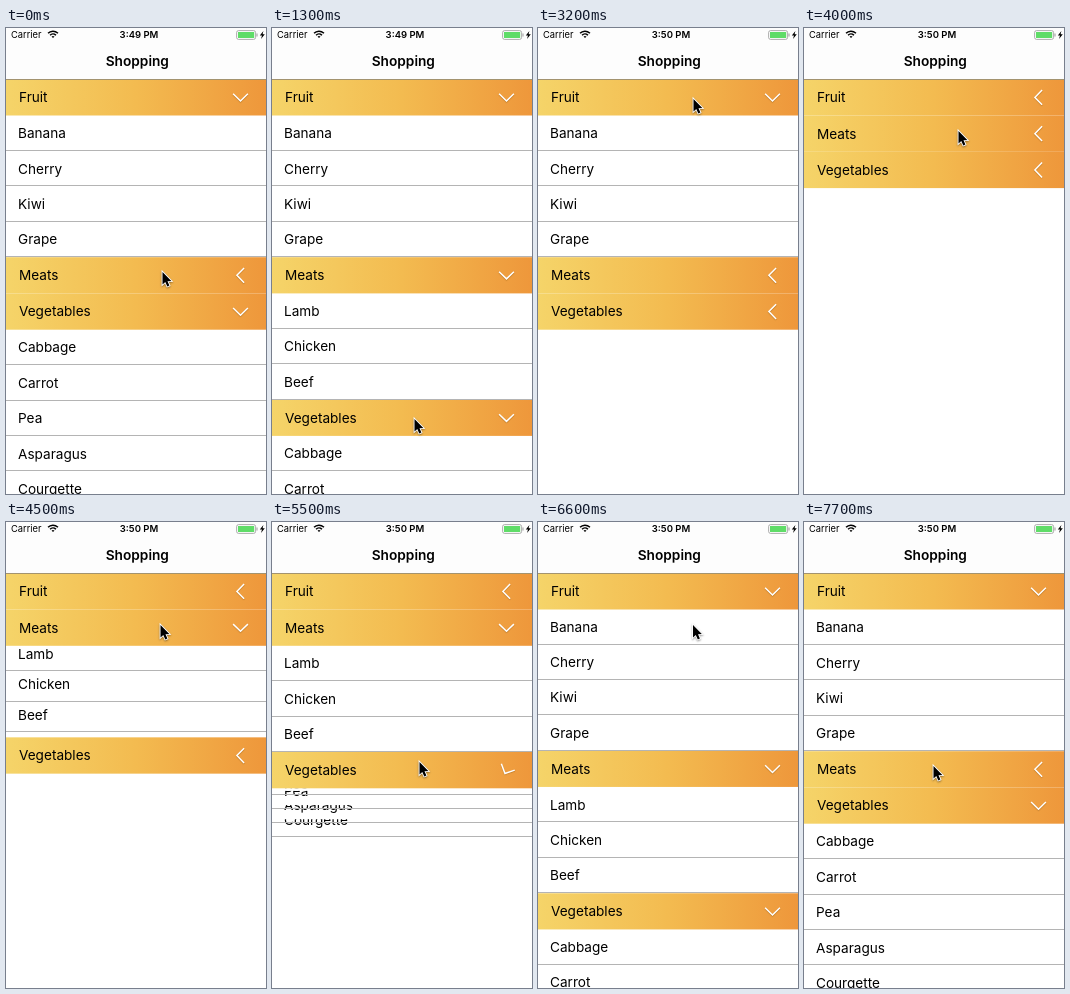
Animation of 260 by 466 pixels, one loop 8400 ms. Source, as an HTML page with a canvas:

```html
<!DOCTYPE html>
<html>
<head>
<meta charset="utf-8">
<style>
html, body { margin: 0; width: 100%; height: 100%; overflow: hidden; background: #fff; }
canvas { display: block; }
</style>
</head>
<body>
<canvas id="stage" width="260" height="466"></canvas>
<script>
const ctx = document.getElementById('stage').getContext('2d');
const W = 260, H = 466, LOOP = 8400, STEP = 100;
const TOP = 51.2, HEADER = 36.3, ROW = 35.4;
const FONT = 'Inter, Roboto, sans-serif';

// toggles: times at which the section opens or closes
const sections = [
  { name: 'Fruit', open: 1, toggles: [3470, 6310], rows: ['Banana', 'Cherry', 'Kiwi', 'Grape'] },
  { name: 'Meats', open: 0, toggles: [270, 2170, 4270, 7370], rows: ['Lamb', 'Chicken', 'Beef'] },
  { name: 'Vegetables', open: 1, toggles: [1295, 5370], rows: ['Cabbage', 'Carrot', 'Pea', 'Asparagus', 'Courgette'] }
];

// pointer moves: start, end, x, y
const pointerStart = [156, 244];
const moves = [
  [700, 1100, 142, 391], [1600, 2100, 145, 244], [2500, 3000, 157, 48], [3000, 3200, 155, 71],
  [3750, 4000, 154, 103], [4700, 5200, 147, 240], [5650, 6100, 155, 71],
  [6450, 6600, 154.5, 103], [6600, 7100, 129, 244]
];

const gradient = ctx.createLinearGradient(0, 0, W, 0);
gradient.addColorStop(0, '#f5d469');
gradient.addColorStop(0.5, '#f3bb50');
gradient.addColorStop(1, '#ee973b');

function ease(x) {
  x = Math.min(1, Math.max(0, x));
  return x * x * (3 - 2 * x);
}

function openness(section, t, duration) {
  let value = section.open, target = value;
  for (const start of section.toggles) {
    if (t < start) break;
    target = 1 - target;
    value += (target - value) * ease((t - start) / duration);
  }
  return value;
}

function text(str, x, y, size, weight = 400, align = 'left') {
  ctx.font = `${weight} ${size}px ${FONT}`;
  ctx.textAlign = align;
  ctx.fillStyle = '#000';
  ctx.fillText(str, x, y);
}

function line(y, color) {
  ctx.fillStyle = color;
  ctx.fillRect(0, Math.round(y) - 1, W, 1);
}

function polyline(points) {
  ctx.beginPath();
  points.forEach(([x, y]) => ctx.lineTo(x, y));
}

function drawChevron(y, turn) {
  ctx.save();
  ctx.translate(234.5, y);
  ctx.rotate(-turn * Math.PI / 2);
  ctx.strokeStyle = '#fff';
  ctx.lineWidth = 1.5;
  ctx.shadowColor = 'rgba(120,70,0,.45)';
  ctx.shadowBlur = 1;
  ctx.shadowOffsetY = 0.7;
  polyline([[3.6, -7.4], [-3.6, 0], [3.6, 7.4]]);
  ctx.stroke();
  ctx.restore();
}

function drawSection({ section, y, p, turn }) {
  if (p > 0) {
    ctx.save();
    ctx.beginPath();
    ctx.rect(0, y + HEADER, W, H);
    ctx.clip();
    // rows fan out from behind the header, upper ones in front
    for (let i = section.rows.length - 1; i >= 0; i--) {
      const bottom = y + p * (HEADER + (i + 1) * ROW);
      ctx.fillStyle = '#fff';
      ctx.fillRect(0, bottom - ROW, W, ROW - (p < 1 ? 4 : 0));
      text(section.rows[i], 12, bottom - 12.8, 13.6);
      line(bottom, '#b4b4b4');
    }
    ctx.restore();
  }
  ctx.fillStyle = gradient;
  ctx.fillRect(0, y, W, HEADER);
  text(section.name, 13, y + 23, 13.6);
  drawChevron(y + 18.2, turn);
}

function drawList(t) {
  let y = TOP;
  const layout = sections.map(section => {
    const p = openness(section, t, 300);
    const item = { section, y, p, turn: openness(section, t, 200) };
    y += HEADER + p * section.rows.length * ROW;
    return item;
  });
  layout.reverse().forEach(drawSection);
}

function drawBar(t) {
  ctx.fillStyle = '#fdfdfd';
  ctx.fillRect(0, 0, W, 51);
  line(52, '#a3936f');
  text('Carrier', 5, 10.3, 9.3);
  text(t < 1700 ? '3:49 PM' : '3:50 PM', 133, 10.3, 9.5, 600, 'center');
  text('Shopping', 131.3, 38, 13.7, 600, 'center');

  ctx.strokeStyle = '#000';
  ctx.lineWidth = 1.5;
  for (const r of [1.2, 4, 6.8]) {
    ctx.beginPath();
    ctx.arc(47, 10, r, -Math.PI * 0.76, -Math.PI * 0.24);
    ctx.stroke();
  }

  ctx.strokeStyle = '#999';
  ctx.lineWidth = 0.8;
  ctx.beginPath();
  ctx.roundRect(230.6, 2.6, 19, 8.8, 2);
  ctx.stroke();
  ctx.fillStyle = '#5fdc68';
  ctx.fillRect(232, 4, 16.2, 6);
  ctx.fillStyle = '#999';
  ctx.fillRect(250.5, 5.5, 1, 3);
  ctx.fillStyle = '#000';
  polyline([[257.4, 3], [253.8, 7.6], [256, 7.6], [255, 11], [258.8, 6.3], [256.6, 6.3]]);
  ctx.fill();
}

function drawPointer(t) {
  let [x, y] = pointerStart;
  for (const [start, end, toX, toY] of moves) {
    const p = ease((t - start) / (end - start));
    x += (toX - x) * p;
    y += (toY - y) * p;
  }
  ctx.save();
  ctx.translate(x, y);
  polyline([[0.5, 0], [0.5, 12.5], [3.3, 9.9], [5.3, 14.4], [7.4, 13.5], [5.5, 9.2], [9.3, 9]]);
  ctx.closePath();
  ctx.shadowColor = 'rgba(0,0,0,.4)';
  ctx.shadowBlur = 2;
  ctx.shadowOffsetY = 1;
  ctx.strokeStyle = '#fff';
  ctx.lineWidth = 1.8;
  ctx.stroke();
  ctx.shadowColor = 'transparent';
  ctx.fillStyle = '#000';
  ctx.fill();
  ctx.restore();
}

function frame() {
  const t = Math.floor(performance.now() % LOOP / STEP) * STEP;
  ctx.fillStyle = '#fff';
  ctx.fillRect(0, 0, W, H);
  drawList(t);
  drawBar(t);
  drawPointer(t);
  requestAnimationFrame(frame);
}
frame();
</script>
</body>
</html>
```
